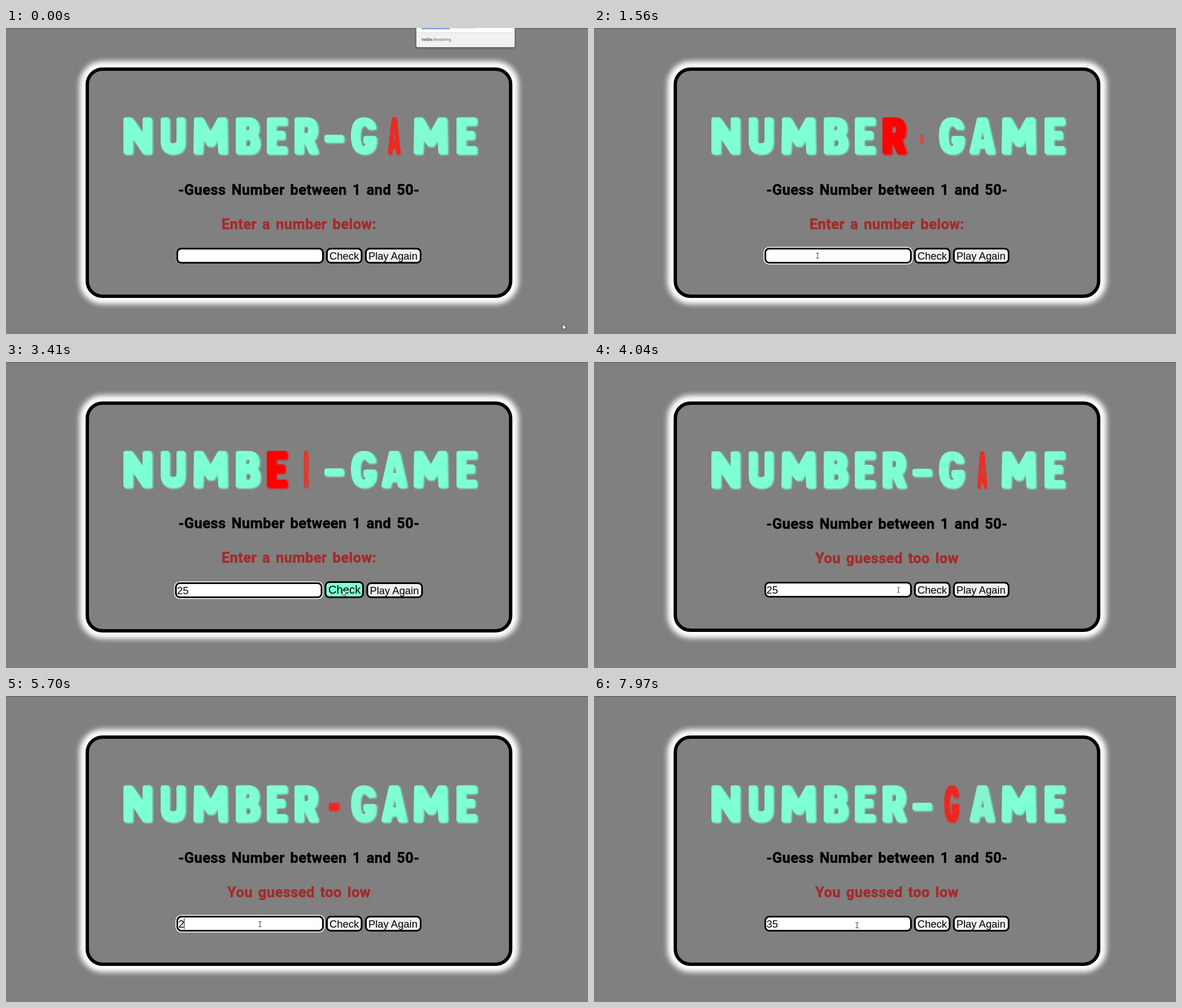
Write an HTML page that moves like this. It is 1031x543 px and loops after 8000 ms.

```html
<!DOCTYPE html>
<html lang="en">
<head>
<meta charset="utf-8">
<title>Number game</title>
<style>
  html, body { margin: 0; width: 100%; height: 100%; overflow: hidden; background: #808080; }
  svg { display: block; width: 1031px; height: 543px; }
  #title path {
    fill: currentColor; stroke: currentColor; stroke-width: 8; stroke-linejoin: round; fill-rule: evenodd;
    filter: drop-shadow(2.5px 2.5px 1.5px currentColor);
  }
  .label {
    font: 700 25.5px Roboto, sans-serif; letter-spacing: .4px; word-spacing: 3.2px; text-anchor: middle;
    stroke: currentColor; stroke-width: .5; stroke-linejoin: round; fill: currentColor;
  }
  .field { stroke: #000; stroke-width: 3; }
  .ui { font: 18.4px "Liberation Sans", Arial, sans-serif; }
  #popup { filter: drop-shadow(0 1px 2px #0007); }
</style>
</head>
<body>
<svg viewBox="0 0 1031 543">
  <rect width="1031" height="1" fill="#5c5c5c"/>
  <rect id="glow" x="130" y="59" width="778" rx="41" fill="#fff" style="filter: blur(5px)"/>
  <rect id="card" x="144" y="73" width="750" rx="27" fill="#808080" stroke="#000" stroke-width="6"/>

  <g id="heading">
    <g id="title" role="img" aria-label="NUMBER-GAME"></g>
    <text class="label" x="519" y="296">-Guess Number between 1 and 50-</text>
    <text class="label" id="message" x="519" y="357" color="#a52a2a"></text>
  </g>

  <g id="entry">
    <rect id="focus" x="301.2" y="389.2" width="262.6" height="29.6" rx="9" fill="none" stroke="#fff" stroke-width="1.6"/>
    <rect class="field" x="303.5" y="391.5" width="258" height="25" rx="7" fill="#fff"/>
    <text class="ui" id="value" x="305.5" y="410.5"></text>
    <rect id="caret" y="394.5" width="1" height="19"/>
  </g>
  <rect class="field" id="check"/>
  <text class="ui" id="checkText">Check</text>
  <g id="again">
    <rect class="field" x="637.5" y="391.5" width="97" height="25" rx="7" fill="#efefef"/>
    <text class="ui" x="642" y="410.5">Play Again</text>
  </g>

  <g id="popup">
    <path d="M727 0H901V32Q901 34 899 34H729Q727 34 727 32Z" fill="#f1f1f1"/>
    <path d="M727 0H901V8H727Z" fill="#fff"/>
    <path d="M727 8H901" stroke="#ddd"/>
    <path d="M736 1.2H832" stroke="#e4e6ea" stroke-width="1.6"/>
    <path d="M736 1.2H786" stroke="#4a7fd6" stroke-width="1.6"/>
    <text x="736" y="23.3" font-family="Roboto, sans-serif" font-size="6.9" fill="#666"><tspan font-weight="500" fill="#444">Veldra</tspan> Rendering</text>
  </g>

  <g id="cursor">
    <circle id="press" r="7" fill="#fff34d" opacity=".8"/>
    <path id="arrow" d="M0 0V10.5L2.4 8.3L4 11.8L5.7 11L4.2 7.7H7.4Z" fill="#fff" stroke="#222" stroke-width=".8"/>
    <path id="beam" d="M-2.5-4.5H-.7L0-4L.7-4.5H2.5M0-4V4M-2.5 4.5H-.7L0 4L.7 4.5H2.5" fill="none" stroke="#333" stroke-width="1"/>
  </g>
</svg>

<script>
const LOOP = 8000;
const AQUA = [127, 255, 212], RED = [255, 0, 0];
const $ = id => document.getElementById(id);
const attrs = (el, values) => { for (const k in values) el.setAttribute(k, values[k]); };
const show = (id, on) => { $(id).style.display = on ? '' : 'none'; };

// Heavy rounded capitals: [width, outline inset by half the stroke]
const GLYPHS = {
  N: [50, 'M4 4H13L38 40V4H46V61H37L12 23V61H4Z'],
  U: [43, 'M4 4H11V42Q11 50 21.5 50T32 42V4H39V42Q39 61 21.5 61T4 42Z'],
  M: [60, 'M5 4H14L30 33L46 4H55L56 61H48L46 26L33 47H27L14 26L12 61H4Z'],
  B: [43, 'M4 4H22Q37 4 37 19Q37 28 31 31Q39 35 39 45Q39 61 23 61H4ZM13 10H21Q28 10 28 18.5T21 27H13ZM13 35H22Q30 35 30 45T22 55H13Z'],
  E: [36, 'M4 4H32V10H12V28H28V35H12V55H32V61H4Z'],
  R: [42, 'M4 4H22Q37 4 37 22Q37 34 29 38L38 61H29L20 41H12V61H4ZM12 11H21Q28 11 28 21.5T21 32H12Z'],
  '-': [34, 'M4 35H30V40H4Z'],
  G: [45, 'M40 17H32Q29 10 23 10Q12 10 12 32.5T23 55Q30 55 31 43H26V37H41Q42 61 23 61Q4 61 4 32.5T23 4Q37 4 40 17Z'],
  A: [45, 'M17 4H28L41 61H33L30 50H15L12 61H4ZM20 13H25L31 43H14Z']
};
const LEFTS = [208, 274, 332, 407, 462, 511, 564, 611, 665, 722, 798];
const letters = [...'NUMBER-GAME'].map((char, i) => {
  const [width, d] = GLYPHS[char];
  const el = document.createElementNS('http://www.w3.org/2000/svg', 'path');
  el.setAttribute('d', d);
  $('title').append(el);
  return { el, half: width / 2, center: LEFTS[i] + width / 2 };
});

// CSS "ease": cubic-bezier(.25, .1, .25, 1)
function ease(x) {
  const curve = (a, b, s) => 3 * a * s * (1 - s) ** 2 + 3 * b * s * s * (1 - s) + s ** 3;
  let lo = 0, hi = 1;
  for (let i = 0; i < 20; i++) {
    const mid = (lo + hi) / 2;
    if (curve(.25, .25, mid) < x) lo = mid; else hi = mid;
  }
  return curve(.1, 1, lo);
}

// Each letter turns once every 2 s, for 0.4 s, staggered by 0.2 s
function drawTitle(t) {
  const clock = t - .029 * Math.max(0, t - 2400);
  letters.forEach(({ el, half, center }, i) => {
    const turn = ((clock - 189 - 200 * i) % 2000 + 2000) % 2000 / 400;
    const p = turn < 1 ? ease(turn) : 0;
    const color = AQUA.map((c, k) => Math.round(c + (RED[k] - c) * p));
    el.style.color = `rgb(${color})`;
    el.setAttribute('transform',
      `translate(${center} 158.5) scale(${Math.cos(2 * Math.PI * (1 - p))} 1) translate(${-half} 0)`);
  });
}

// Pointer moves: [start, end, x, y]
const MOVES = [[80, 680, 396, 404], [2920, 3280, 596, 404], [3850, 4300, 450, 405],
  [6920, 7220, 596, 405], [7560, 7860, 466, 407]];
const CLICKS = [1020, 3520, 4600, 7350];
const TYPING = [[0, ''], [2640, '2'], [2820, '25'], [5450, '2'], [6000, ''], [6400, '3'], [6850, '35']];

function pointer(t) {
  let x = 986, y = 525;
  for (const [start, end, tx, ty] of MOVES) {
    const s = Math.min(1, Math.max(0, (t - start) / (end - start)));
    const k = s * s * (3 - 2 * s);
    x += (tx - x) * k;
    y += (ty - y) * k;
  }
  return [x, y];
}

function draw(t) {
  drawTitle(t);
  const [x, y] = pointer(t);
  const hover = Math.abs(x - 599) < 33 && y < 419;
  const grow = hover ? 1 : 0;

  attrs($('card'), { height: 403 + grow });
  attrs($('glow'), { height: 431 + grow });
  attrs($('heading'), { transform: `translate(0 ${-.8 * grow})` });
  attrs($('entry'), { transform: `translate(${-2.5 * grow} ${grow})` });
  attrs($('again'), { transform: `translate(${2.5 * grow} ${grow})` });
  attrs($('check'), {
    x: 568.5 - 2.5 * grow, y: 391.5 - grow, width: 61.5 + 5 * grow, height: 25 + 2 * grow,
    rx: 7, fill: hover ? '#7fffd4' : '#efefef'
  });
  attrs($('checkText'), { x: 573 - 2 * grow, y: 410.5 + grow / 2 });
  $('checkText').style.fontSize = hover ? '20.2px' : '';
  $('message').textContent = t < CLICKS[1] ? 'Enter a number below:' : 'You guessed too low';

  const [typedAt, value] = TYPING.filter(([at]) => at <= t).pop();
  const focusedAt = t >= CLICKS[2] ? CLICKS[2] : CLICKS[0];
  const focused = t >= CLICKS[0] && t < CLICKS[1] || t >= CLICKS[2] && t < CLICKS[3];
  const blinkFrom = Math.max(typedAt, focusedAt);
  $('value').textContent = value;
  attrs($('caret'), { x: 305 + 10.3 * value.length });
  show('focus', focused);
  show('caret', focused && !hover && (t - blinkFrom) % 1060 < 530);
  show('popup', t < 1050);

  const overField = x > 302 && x < 563 && y > 390 && y < 418;
  attrs($('cursor'), { transform: `translate(${x} ${y})` });
  show('arrow', !overField);
  show('beam', overField);
  show('press', CLICKS.some(at => t >= at && t < at + 200));
}

function frame() {
  draw(performance.now() % LOOP);
  requestAnimationFrame(frame);
}
frame();
</script>
</body>
</html>
```
